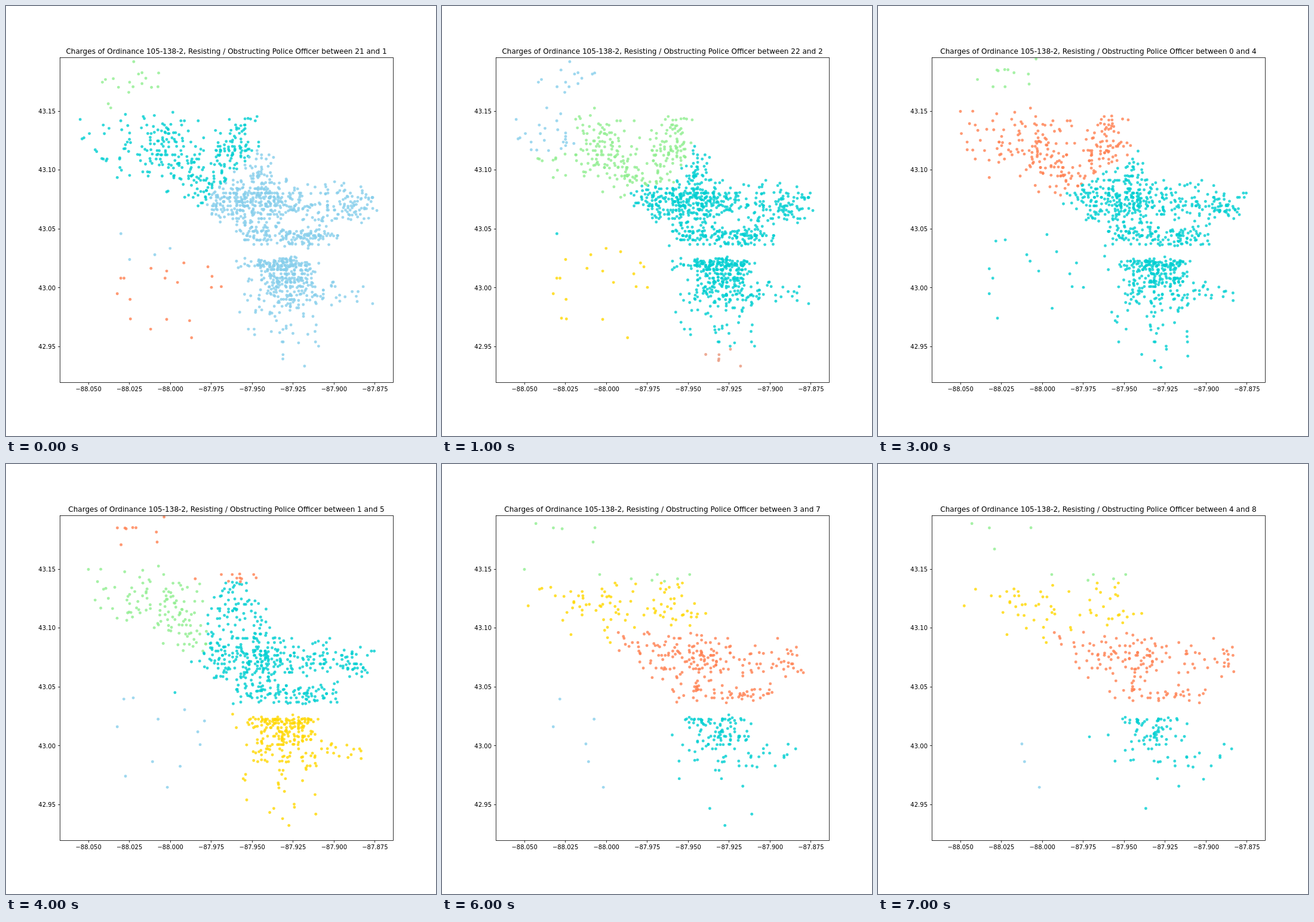
These frames come from a looping animation (720 by 720 pixels, 8000 ms). An HTML page with a canvas:

```html
<!DOCTYPE html>
<html lang="en">
<head>
<meta charset="utf-8">
<title>Charges by hour</title>
<style>
  html, body { margin: 0; width: 100%; height: 100%; overflow: hidden; background: #fff; }
  canvas { display: block; }
</style>
</head>
<body>
<canvas id="stage" width="720" height="720"></canvas>
<script>
const ctx = document.getElementById('stage').getContext('2d');
const FONT = '"DejaVu Sans", sans-serif';
const STEP = 1000, STEPS = 8, WINDOW = 4, FIRST_HOUR = 21;
const sky = '#87ceeb', green = '#90ee90', teal = '#00ced1', coral = '#ff7f50',
      gold = '#ffd700', salmon = '#e9967a';

// Neighbourhoods: centre x, y, reach x, y, weight
const areas = [
  [208, 118, 72, 30, 16],   // far north
  [165, 215, 58, 65, 16],   // north-west edge
  [262, 235, 85, 65, 125],
  [385, 240, 45, 64, 100],
  [318, 288, 70, 52, 62],
  [365, 327, 52, 42, 105],  // centre, west to east
  [430, 322, 62, 44, 210],
  [428, 268, 26, 38, 25],
  [515, 330, 75, 48, 95],
  [587, 332, 34, 36, 55],
  [425, 378, 48, 26, 75],
  [505, 387, 65, 18, 95],
  [455, 432, 74, 11, 95],   // south of the gap
  [470, 452, 55, 32, 145],
  [470, 485, 80, 38, 90],
  [555, 484, 65, 28, 24],
  [470, 535, 90, 80, 32],
  [280, 467, 130, 95, 22],  // south-west
];

// Cluster colour of a position, one rule per step
const lateNight = (x, y) =>
  y < 140 || x > 280 && y < 198 ? coral :
  x < 336 && y < 315 ? green :
  x < 280 || x < 360 && y > 385 ? sky :
  y < 410 ? teal : gold;
const morning = (x, y) =>
  y < 198 ? green :
  y < 280 && x < 450 || x < 285 && y < 320 ? gold :
  x < 290 ? sky : y < 405 ? coral : teal;
const clusters = [
  (x, y) => y + 0.1 * x < 201 ? green :
    x + y < 660 && y < 345 ? teal :
    x < 370 && y > 430 ? coral : sky,
  (x, y) => x < 222 && y < 245 || y < 165 ? sky :
    2 * x + y < 1072 && y < 300 || x < 312 && y < 345 ? green :
    x < 370 && y > 385 ? gold :
    y > 573 ? salmon : teal,
  (x, y) => y < 165 ? gold :
    x < 402 + 0.2 * y && y < 372 ? teal :
    x < 360 && y > 385 ? coral :
    y > 541 ? sky : green,
  (x, y) => y < 165 ? green :
    x < 425 && y + 0.56 * x < 491 ? coral : teal,
  lateNight, lateNight, morning, morning,
];

let seed = 20;
function random() {
  seed = (seed * 1664525 + 1013904223) >>> 0;
  return seed / 4294967296;
}

const spread = reach => reach * (random() + random() - 1);
const snap = (value, gap) => Math.round(value / gap) * gap;
const totalWeight = areas.reduce((sum, area) => sum + area[4], 0);

function pickArea(share) {
  let rest = share * totalWeight;
  return areas.find(area => (rest -= area[4]) < 0) || areas[0];
}

// Some events line up along streets
function makeEvent(share, hour) {
  const [cx, cy, reachX, reachY] = pickArea(share);
  let x = cx + spread(reachX), y = cy + spread(reachY);
  const street = random();
  if (street < 0.2) x = snap(x, 6.9);
  else if (street < 0.5) y = snap(y, 7.12);
  return { x, y, hour };
}

// Steady through the night, falling off after bar closing time
const eventCount = hour => Math.round(45 + 315 / (1 + Math.exp((hour - 5.9) / 1.1)));

const events = [];
for (let hour = 0; hour < STEPS + WINDOW - 1; hour++) {
  const count = eventCount(hour);
  for (let i = 0; i < count; i++) events.push(makeEvent((i + random()) / count, hour));
}

function label(text, x, y, align, size = 10) {
  ctx.font = `${size}px ${FONT}`;
  ctx.textAlign = align;
  ctx.fillText(text, x, y);
}

function drawAxes(step) {
  ctx.fillStyle = ctx.strokeStyle = '#000';
  ctx.lineWidth = 0.8;
  ctx.strokeRect(90.5, 86.5, 558, 544);
  ctx.beginPath();
  for (let i = 0; i < 8; i++) {
    const x = 138.1 + i * 68.54, px = Math.floor(x) + 0.5;
    ctx.moveTo(px, 630.5);
    ctx.lineTo(px, 634);
    label('\u2212' + (88.05 - i * 0.025).toFixed(3), x, 645, 'center');
  }
  for (let i = 0; i < 5; i++) {
    const y = 570.5 - i * 98.6, py = Math.floor(y) + 0.5;
    ctx.moveTo(90.5, py);
    ctx.lineTo(87, py);
    label((42.95 + i * 0.05).toFixed(2), 83, Math.round(y + 3.7), 'right');
  }
  ctx.stroke();
  const from = (FIRST_HOUR + step) % 24, to = (from + WINDOW) % 24;
  label(`Charges of Ordinance 105-138-2, Resisting / Obstructing Police Officer between ${from} and ${to}`,
    369, 80, 'center', 12.05);
}

function draw(step) {
  ctx.fillStyle = '#fff';
  ctx.fillRect(0, 0, 720, 720);
  ctx.globalAlpha = 0.8;
  for (const { x, y, hour } of events) {
    if (hour < step || hour >= step + WINDOW) continue;
    ctx.fillStyle = clusters[step](x, y);
    ctx.beginPath();
    ctx.arc(x, y, 2.45, 0, 2 * Math.PI);
    ctx.fill();
  }
  ctx.globalAlpha = 1;
  drawAxes(step);
}

function tick() {
  draw(Math.floor(performance.now() / STEP) % STEPS);
  requestAnimationFrame(tick);
}
tick();
</script>
</body>
</html>
```
